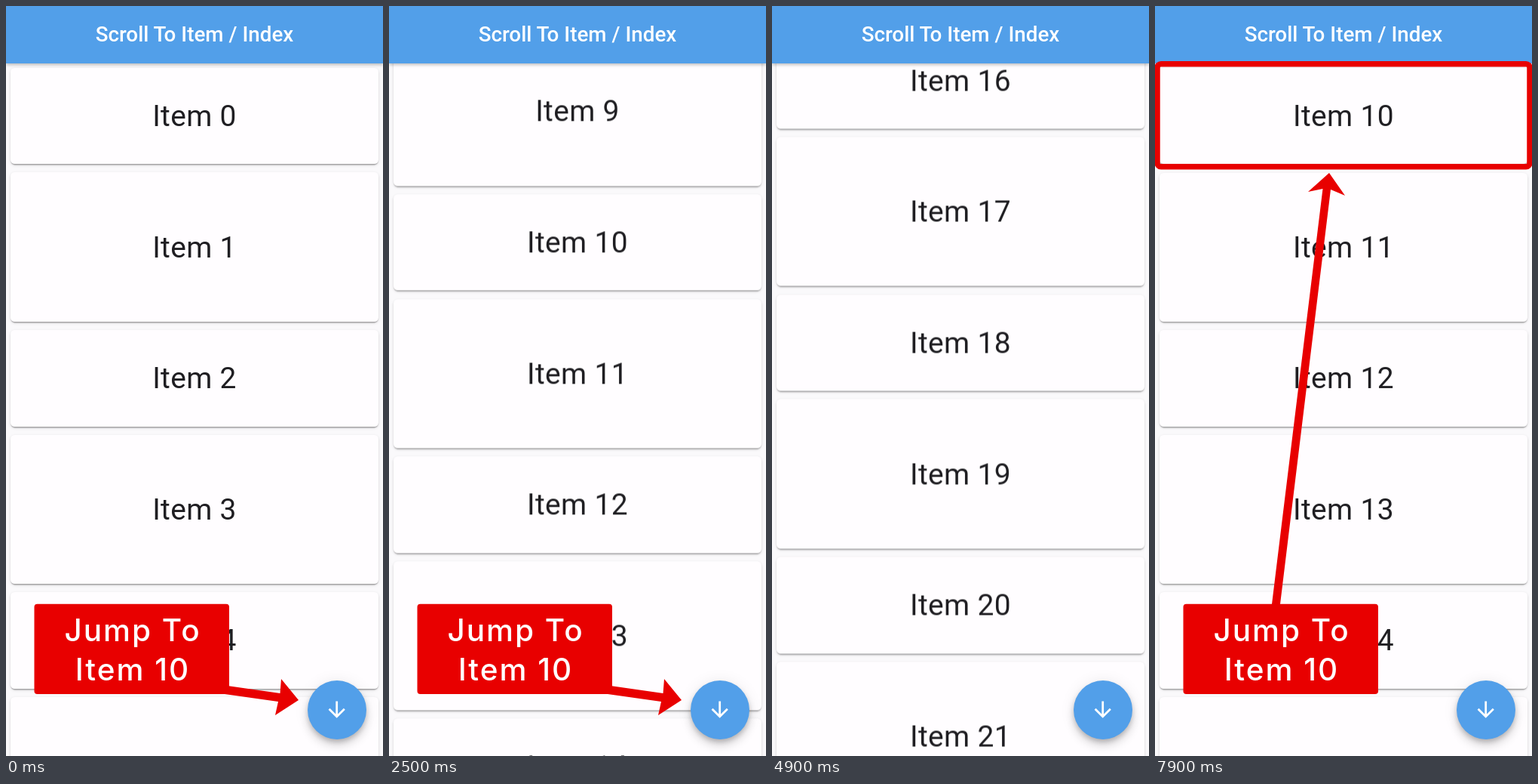
An HTML page for the animation above (8000 ms loop, 500 by 993 pixels).

```html
<!DOCTYPE html>
<html lang="en">
<head>
<meta charset="utf-8">
<title>Scroll to item</title>
<style>
html, body { margin: 0; width: 100%; height: 100%; overflow: hidden; background: #faf9fb; }
#stage { position: relative; width: 500px; height: 993px; overflow: hidden; font-family: Roboto, sans-serif; }
#stage > * { position: absolute; }
#list { left: 0; top: 76.4px; width: 500px; will-change: transform; }
.card {
  position: absolute; left: 5.6px; width: 488.8px; border-radius: 5.5px;
  display: flex; align-items: center; justify-content: center;
  background: #fffdff; color: #1f1e22; font-size: 38.9px; letter-spacing: .35px;
  box-shadow: 0 2.8px 1.4px -1.4px #0003, 0 1.4px 1.4px #00000024, 0 1.4px 4px #0000001f;
}
header {
  left: 0; top: 0; width: 500px; height: 76.4px; line-height: 76.4px; text-align: center;
  background: #529fe9; color: #fff; font-size: 27.8px; font-weight: 500;
  box-shadow: 0 1.5px 4px #00000040;
}
#fab { left: 400px; top: 893px; width: 78px; height: 78px; border-radius: 50%; }
#fab svg { position: absolute; left: 22.3px; top: 22.3px; }
#notes { left: 0; top: 0; }
#notes text { font: 500 40.5px Inter, sans-serif; letter-spacing: 2px; text-anchor: middle; fill: #fff; }
</style>
</head>
<body>
<div id="stage">
  <div id="list"></div>
  <header>Scroll To Item / Index</header>
  <div id="fab">
    <svg width="33.4" height="33.4" viewBox="0 0 24 24" fill="#fff">
      <path d="M20 12l-1.41-1.41L13 16.17V4h-2v12.17l-5.58-5.59L4 12l8 8 8-8z"/>
    </svg>
  </div>
  <svg id="notes" width="500" height="993" fill="#e80000">
    <path id="toButton" d="M290 899.5L363.5 910 365 891 388 919 357 939 361 921 290 911Z"/>
    <g id="toItem">
      <rect x="3" y="76.7" width="494" height="136" rx="5" fill="none" stroke="#e80000" stroke-width="7.5"/>
      <path d="M154.5 796L222.5 242 203 246 231 221 252 251 233 243 165.5 796Z"/>
    </g>
    <g id="callout">
      <rect x="37.5" y="791.7" width="258.5" height="119.3" rx="4"/>
      <text x="168" y="841">Jump To</text>
      <text x="168" y="892.5">Item 10</text>
    </g>
  </svg>
</div>
<script>
const LOOP = 8000, DP = 500 / 360, PAIR = 250 * DP;
const TARGET = 5 * PAIR, FAR = 3005;
const $ = id => document.getElementById(id);

// Cards alternate between 100 and 150 dp, each with a 4 dp margin.
for (let i = 0; i < 30; i++) {
  const odd = i % 2, card = document.createElement('div');
  card.className = 'card';
  card.textContent = 'Item ' + i;
  card.style.top = (i >> 1) * PAIR + (odd * 100 + 4) * DP + 'px';
  card.style.height = (odd ? 142 : 92) * DP + 'px';
  $('list').append(card);
}

function ease(t, start, end) {
  const x = Math.min(1, Math.max(0, (t - start) / (end - start)));
  return x * x * (3 - 2 * x);
}

const pulse = (t, start) => ease(t, start, start + 150) - ease(t, start + 650, start + 850);
const mix = (a, b, k) => a + (b - a) * k;
const show = (id, on) => { $(id).style.display = on ? '' : 'none'; };

function draw(t) {
  const scroll = TARGET * ease(t, 1693, 2693)
    + (FAR - TARGET) * (ease(t, 3940, 5200) - ease(t, 6771, 7771));
  $('list').style.transform = `translateY(${-scroll}px)`;

  const press = pulse(t, 1000) + pulse(t, 6078);
  const fab = $('fab').style;
  fab.background = `rgb(${mix(82, 155, press)},${mix(159, 184, press)},${mix(233, 212, press)})`;
  fab.boxShadow = `0 ${mix(4, 9, press)}px ${mix(7, 11, press)}px -1px #0003,
    0 ${mix(8, 15, press)}px ${mix(14, 24, press)}px #00000024, 0 1px 20px #00000014`;

  const found = (t >= 2700 && t < 3700) || t >= 7800;
  const hint = t < 2700 || (t >= 5400 && t < 7800);
  show('toItem', found);
  show('toButton', hint);
  show('callout', found || hint);
}

const begin = performance.now();
function tick() {
  draw((performance.now() - begin) % LOOP);
  requestAnimationFrame(tick);
}
tick();
</script>
</body>
</html>
```
